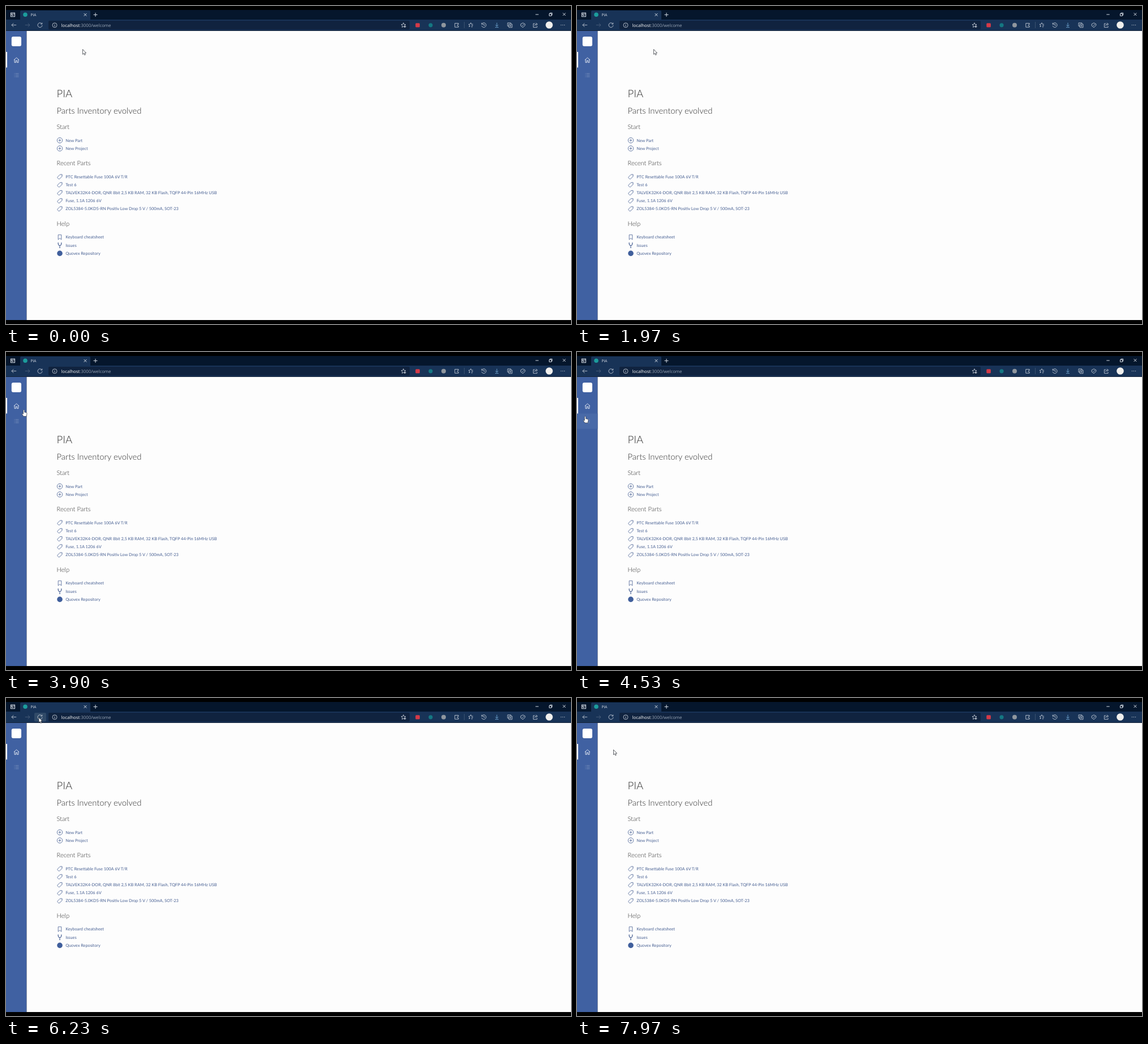
Animation of 998 by 561 pixels, one loop 8 s. Source, as an HTML page:

```html
<!DOCTYPE html>
<html lang="en">
<head>
<meta charset="utf-8">
<title>PIA</title>
<style>
  html, body { margin: 0; width: 100%; height: 100%; overflow: hidden; background: #000; }
  svg { display: block; width: 998px; height: 561px; }
  text { white-space: pre; text-rendering: geometricPrecision; }
  .ui { font-family: "Open Sans", sans-serif; }
  .page text { font-family: Lato, sans-serif; }
  .page .head { font-weight: 300; font-size: 11.1px; fill: #303030; }
  .page .row { font-size: 7.33px; fill: #465f92; }
  .icon { fill: none; stroke: #d3dae3; stroke-width: .8; stroke-linejoin: round; }
  .page .icon { stroke: #465f92; }
</style>
</head>
<body>
<svg viewBox="0 0 998 561">
  <rect width="998" height="561"/>
  <rect y="7" width="998" height="17" fill="#05162c"/>
  <rect y="24" width="998" height="19.5" fill="#183357"/>
  <path d="M25 24V10q0-2 2-2H147q2 0 2 2V24Z" fill="#183357"/>
  <rect x="75" y="26" width="638" height="15.5" rx="2" fill="#10233f"/>
  <rect y="43" width="998" height="1" fill="#142238"/>
  <rect y="44" width="36.5" height="510" fill="#4061a2"/>
  <rect x="36.5" y="44" width="961.5" height="510" fill="#fdfdfd"/>

  <g class="ui">
    <circle cx="34" cy="15.3" r="3.8" fill="#1c9c9c"/>
    <text x="43.5" y="17.6" font-size="6.5" fill="#e6eaf0">PIA</text>
    <text x="97.6" y="36.7" font-size="7.8" fill="#fff">localhost<tspan fill="#98a5b6">:3000/welcome</tspan></text>
  </g>
  <rect id="refreshHover" x="50" y="26" width="21" height="15.5" rx="2" fill="#304a68"/>
  <g id="toolbar"></g>
  <path d="M809.5 28V39" stroke="#4a5f7c" stroke-width=".7"/>
  <rect x="723.3" y="30.2" width="7.6" height="7.2" rx="1.5" fill="#d53a48"/>
  <circle cx="750" cy="33.8" r="3.6" fill="#147782"/>
  <circle id="blocker" cx="773" cy="33.8" r="4"/>
  <circle cx="959.5" cy="33.5" r="6.3" fill="#f0efed"/>
  <g id="reloadIcon"></g>
  <g id="stopIcon"></g>

  <rect id="navHover" y="108.5" width="36.5" height="27" fill="#496aa8"/>
  <rect x="9.8" y="54" width="17.2" height="17" rx="3" fill="#fff"/>
  <rect y="81" width="2" height="27.5" fill="#fff"/>
  <g id="sidebar"></g>

  <g class="page">
    <g id="intro">
      <text class="head" x="89.5" y="160.7" style="font-size:18.5px">PIA</text>
      <text class="head" x="89.5" y="190.2" style="font-size:14.8px">Parts Inventory evolved</text>
      <text class="head" x="89.5" y="216.6">Start</text>
      <text class="head" x="89.5" y="281.2">Recent Parts</text>
    </g>
    <g id="recent"></g>
    <g id="help"><text class="head" x="89.5" y="387.5">Help</text></g>
  </g>

  <g id="cursor" stroke-linejoin="round">
    <path id="arrow" d="M0 0V8.8L2 7 3.3 10 4.8 9.3 3.5 6.4H6.1Z" fill="#fff" stroke="#20242c" stroke-width=".7"/>
    <path id="hand" d="M-1.1 .9Q0-.9 1.1 .9V4.2L4.2 4.9Q5.6 5.3 5.4 7L4.6 11.5H-.6L-3.3 7.6Q-3.4 6-1.1 7.4Z" fill="#fff" stroke="#20242c" stroke-width=".6"/>
  </g>
</svg>
<script>
const $ = id => document.getElementById(id);

function add(parent, tag, attrs) {
  const el = document.createElementNS('http://www.w3.org/2000/svg', tag);
  for (const key in attrs) el.setAttribute(key, attrs[key]);
  return parent.appendChild(el);
}

const icon = (parent, x, y, d, style = '') =>
  add(parent, 'path', { class: 'icon', d, style, transform: `translate(${x} ${y})` });

// Paths are centred on 0,0
const CROSS = 'M-2.4-2.4 2.4 2.4M-2.4 2.4 2.4-2.4';
const PLUS = 'M-3.5 0H3.5M0-3.5V3.5';
const RING = 'M-4 0A4 4 0 1 1 4 0A4 4 0 1 1-4 0';
const STAR = 'M0-4 1.2-1.2 4-1 1.8 1 2.4 4 0 2.4-2.4 4-1.8 1-4-1-1.2-1.2Z';
const DIM = 'stroke:#536782';

const bar = $('toolbar');
icon(bar, 12, 15.4, 'M-3.5-3.4H3.5V3.4H-3.5ZM-3.5-1.4H3.5M-1.5 1.4H1.5M-1.5 1.4V-1.4', 'stroke-width:1.1');
icon(bar, 140, 15.4, CROSS, 'stroke-width:1');
icon(bar, 158, 15.4, PLUS, 'stroke-width:1');
icon(bar, 938, 15, 'M-2.7 0H2.7', 'stroke-width:1');
icon(bar, 962, 14.8, 'M-2.5-1.2H1.4V2.6H-2.5ZM-1.2-1.2V-2.6H2.7V1.3H1.4', 'stroke-width:1');
icon(bar, 986, 14.6, CROSS, 'stroke-width:1');
icon(bar, 14, 33.6, 'M4.2 0H-4M-.7-3.3-4 0-.7 3.3');
icon(bar, 38, 33.6, 'M-4.2 0H4M.7-3.3 4 0 .7 3.3', DIM);
icon(bar, 86, 33.8, RING + 'M0-.7V2.2M0-2.2V-1.4');
icon(bar, 702, 33.6, STAR + 'M1 2.6H4.8M2.9 .7V4.5');
icon(bar, 796, 33.8, 'M3.2-1.2V-3.3H-3.2V3.5H3.2V1.4Q1 1.8 1 0T3.2-1.2Z');
icon(bar, 821, 33.6, 'M-1.2 1.6-3 3.4-2.2 .5-4-1.2-1.4-1.6 0-4 1.2-1.4H4M1.2 1H4M.8 3.2H3');
icon(bar, 844, 33.6, 'M-3.6-1.6A4 4 0 1 1-3.8 1.2M-3.8-4V-1.4H-1.2M0-2.2V.4H2');
icon(bar, 867, 33.6, 'M0-4V2.2M-2.5-.3 0 2.2 2.5-.3M-3 4H3', 'stroke:#7fb9e6');
icon(bar, 890, 33.8, 'M-1.8-1.8H4V4H-1.8ZM-1.8 1.6H-4V-4H1.8V-1.8M-.4 1.1H2.6M1.1-.4V2.6');
icon(bar, 913, 33.8, 'M-3.8-2 0-4 3.8-2V.5L0 4-3.8 1.2ZM-1.4 1.2 2.2-1.6');
icon(bar, 935, 33.8, 'M-.8-2.8H-3.6V3.8H3V1.4M-1.5 1Q-1-1.8 2-1.8M.8-3.8 3.8-1.8 .8 .4');
for (const dx of [-3, 0, 3]) add(bar, 'circle', { cx: 983.5 + dx, cy: 33.6, r: .7, fill: '#d3dae3' });
icon($('reloadIcon'), 60, 33.6, 'M3.4-2A4 4 0 1 0 4 .4M3.8-4.2V-1.7H1.2');
icon($('stopIcon'), 60, 33.6, CROSS, 'stroke:#6d8098');

const side = $('sidebar');
icon(side, 18.5, 95.5, 'M-4.6-.2 0-4.3 4.6-.2M-3.4-1.2V4.2H-1.1V.8H1.1V4.2H3.4V-1.2', 'stroke:#fff');
icon(side, 18.5, 122, 'M-4-2.8H-3M-1.8-2.8H4M-4 0H-3M-1.8 0H4M-4 2.8H-3M-1.8 2.8H4', 'stroke:#8297c0');

const ADD = 'M-4.7 0A4.7 4.7 0 1 1 4.7 0A4.7 4.7 0 1 1-4.7 0M-2.4 0H2.4M0-2.4V2.4';
const TAG = 'M.5-3.9 3.6-4.1Q4.4-4 4.3-3.2L4-.4-1 4.1Q-1.5 4.4-2 4L-4.2 1.5Q-4.5 1-4 .5ZM2.2-2.4H2.9';
const BOOKMARK = 'M-2.8-4.2H2.8V4.2L0 1.8-2.8 4.2Z';
const FORK = 'M-2.8-3.4Q-3 0 0 .6 3 0 2.8-3.4M0 .6V4.6M-3.6-4H-2M2-4H3.6M-.8 4.4H.8';

function row(parent, y, path, label) {
  if (path) icon(parent, 95, y, path, path === FORK ? 'stroke-width:1.1' : '');
  else add(parent, 'circle', { cx: 95, cy: y, r: 4.8, fill: '#405f9c' });
  add(parent, 'text', { class: 'row', x: 105.2, y: y + 2.5 }).textContent = label;
}

row($('intro'), 237, ADD, 'New Part');
row($('intro'), 251.3, ADD, 'New Project');
[
  'PTC Resettable Fuse 100A 6V T/R',
  'Test 6',
  'TALVEK32K4-DOR, QNR 8bit 2,5 KB RAM, 32 KB Flash, TQFP 44-Pin 16MHz USB',
  'Fuse, 1.1A 1206 6V',
  'ZOL5384-5.0KD5-RN Positiv Low Drop 5 V / 500mA, SOT-23'
].forEach((label, i) => row($('recent'), 301.2 + 14.15 * i, TAG, label));
row($('help'), 407.9, BOOKMARK, 'Keyboard cheatsheet');
row($('help'), 422.1, FORK, 'Issues');
row($('help'), 436.4, null, 'Quovex Repository');

// Pointer stops: time, x, y
const stops = [
  [0, 135.5, 76.5], [2300, 135.5, 76.5], [2850, 124.8, 39], [3300, 124.8, 39],
  [4100, 14.5, 113.5], [5600, 14.5, 113.5], [6150, 58, 34.5], [6700, 58.8, 33.8],
  [7480, 58.8, 33.8], [7880, 64.5, 91.3], [8000, 64.5, 91.3]
];

function pointerAt(t) {
  const i = stops.findIndex(s => s[0] > t);
  const [t0, x0, y0] = stops[i - 1], [t1, x1, y1] = stops[i];
  const p = (t - t0) / (t1 - t0), e = p * p * (3 - 2 * p);
  return [x0 + (x1 - x0) * e, y0 + (y1 - y0) * e];
}

const show = (id, on) => $(id).style.display = on ? '' : 'none';

function draw() {
  const t = performance.now() % 8000;
  const [x, y] = pointerAt(t);
  const loading = t >= 7000 && t < 7360;
  const onSidebar = x < 36.5 && y > 81;
  const shift = loading ? 40.6 : 0;

  $('cursor').setAttribute('transform', `translate(${x} ${y})`);
  show('hand', onSidebar);
  show('arrow', !onSidebar);
  show('navHover', onSidebar && y > 108);
  show('refreshHover', x > 50 && x < 71 && y < 42);
  show('reloadIcon', !loading);
  show('stopIcon', loading);
  show('recent', !loading);
  $('blocker').setAttribute('fill', loading ? '#a50d1c' : '#8f969e');
  $('intro').setAttribute('transform', `translate(0 ${shift})`);
  $('help').setAttribute('transform', `translate(0 ${-shift})`);
  requestAnimationFrame(draw);
}
draw();
</script>
</body>
</html>
```
